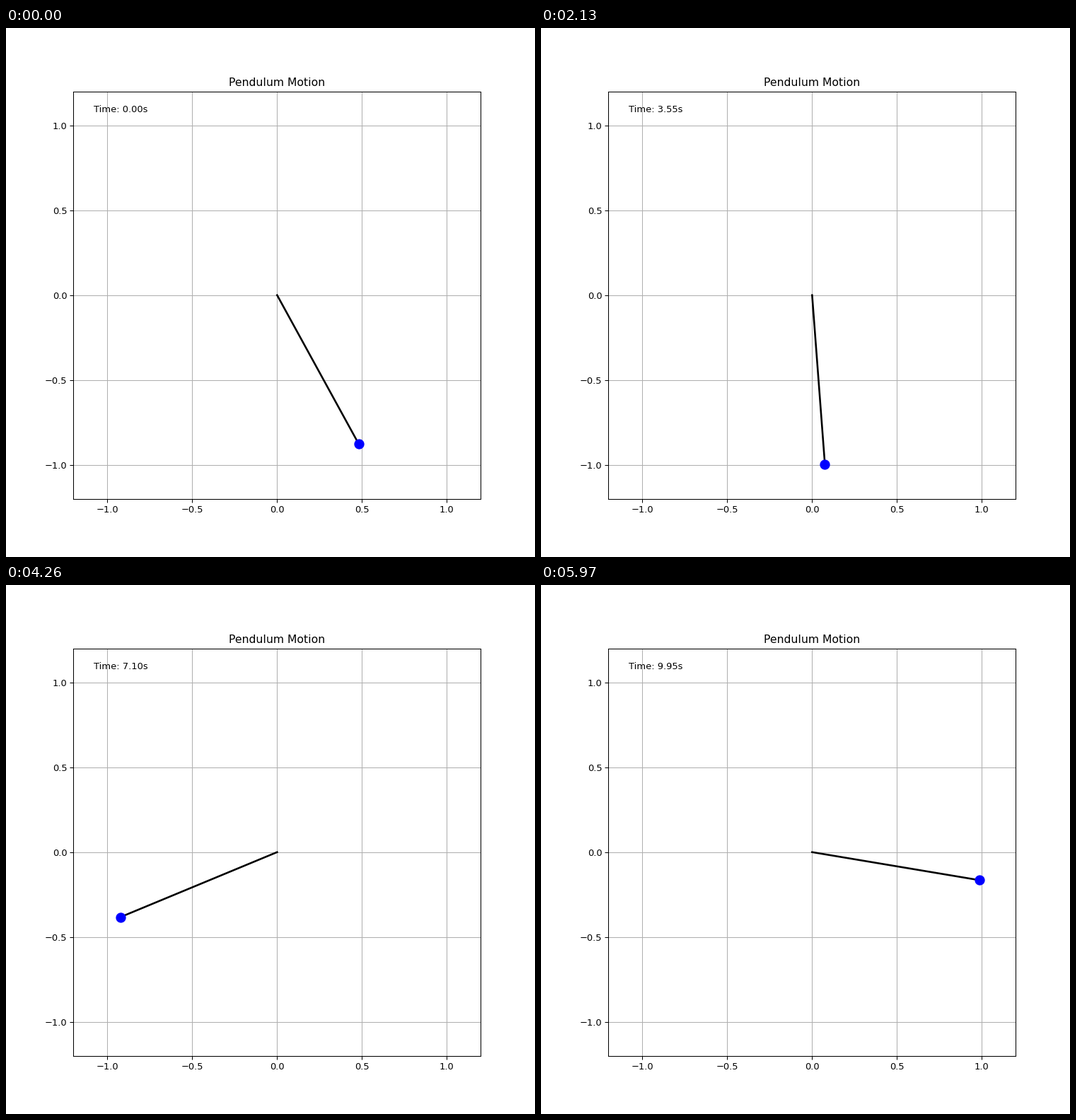
Write a matplotlib script that moves like this. It is 748 px wide and 748 px high and loops after 6 s.

```python
import numpy as np
import matplotlib.pyplot as plt
from matplotlib.animation import FuncAnimation

DT = 0.05
FRAMES = 200
LENGTH = 1.0
PERIOD = 1.107
LEAD = 0.029


def swing_angle(t):
    """Swing that builds up, then slowly fades and leans to the right."""
    c = np.cos(2 * np.pi * (t + LEAD) / PERIOD)
    growth = 1 - 0.67 * np.exp(-1.5 * t)
    swing = (1.52 - 0.0205 * t) * growth
    lean = (0.2 - 0.0105 * t) * growth**3
    return swing * c + lean * (1.5 * c**2 - 0.5)


fig, ax = plt.subplots(figsize=(8, 8), dpi=93.5)
ax.set_xlim(-1.2, 1.2)
ax.set_ylim(-1.2, 1.2)
ax.set_aspect("equal")
ax.grid(True)
ax.set_title("Pendulum Motion")

rod, = ax.plot([], [], "k-", lw=2)
bob, = ax.plot([], [], "bo", markersize=10)
clock = ax.text(0.05, 0.95, "", transform=ax.transAxes)


def update(frame):
    t = frame * DT
    angle = swing_angle(t)
    x, y = LENGTH * np.sin(angle), -LENGTH * np.cos(angle)
    rod.set_data([0, x], [0, y])
    bob.set_data([x], [y])
    clock.set_text(f"Time: {t:.2f}s")
    return rod, bob, clock


anim = FuncAnimation(fig, update, frames=FRAMES, interval=30, repeat=True,
                     repeat_delay=0, blit=False)
plt.show()
```
